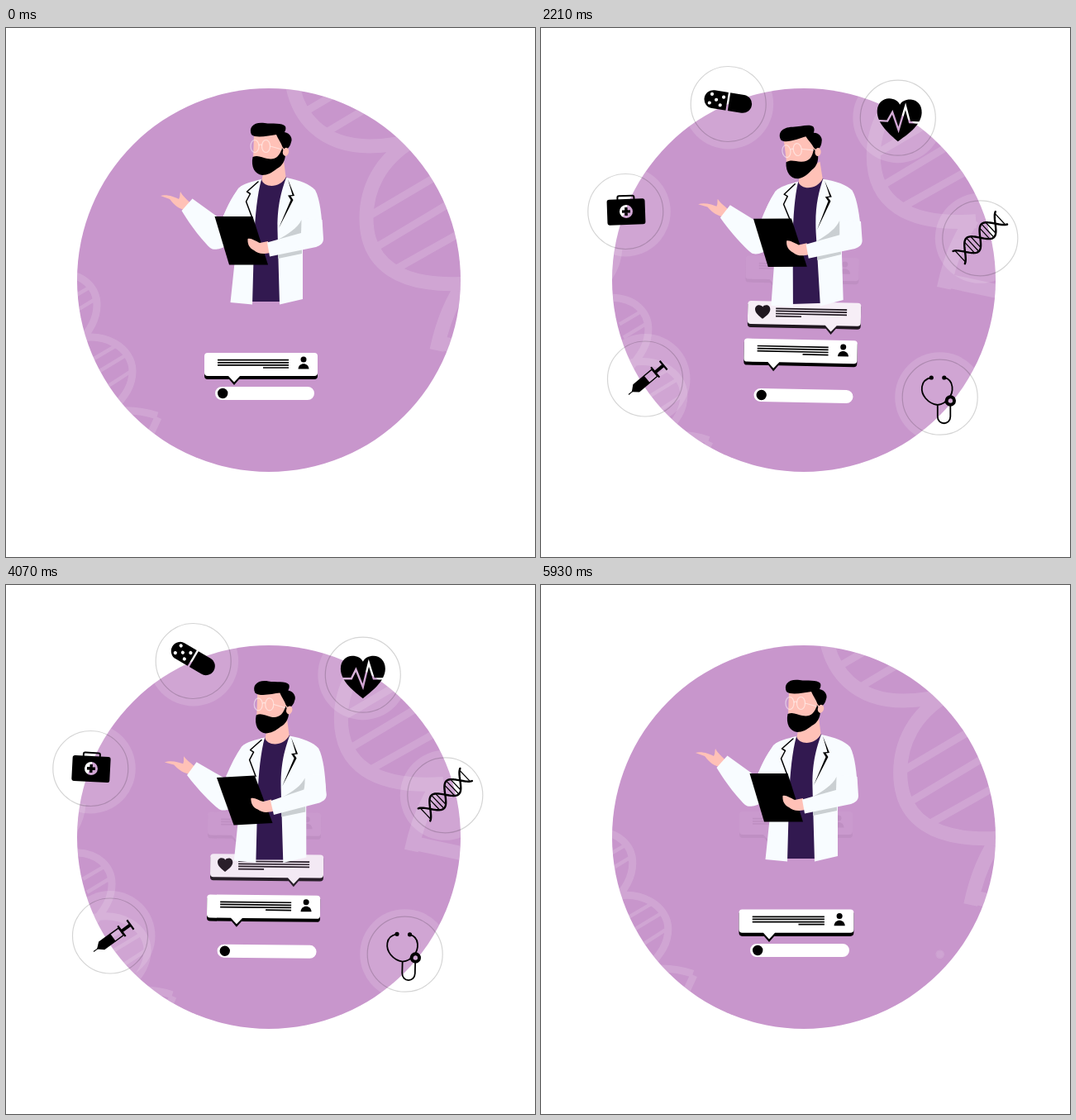
Write an HTML page that moves like this. It is 640 px wide and 640 px high and loops after 6 s.

```html
<!DOCTYPE html>
<html lang="en">
<head>
<meta charset="utf-8">
<title>Online doctor</title>
<style>
  html, body { margin: 0; width: 100%; height: 100%; overflow: hidden; background: #fff; }
  svg { display: block; width: 100vw; height: 100vh; }
  .strand { fill: none; stroke: #fff; opacity: .15; }
  .halo { fill: #fff; opacity: .14; }
  .rim { fill: none; stroke: #000; stroke-opacity: .17; stroke-width: 1.2; }
  .line { fill: none; stroke: #000; stroke-linecap: round; stroke-linejoin: round; }
  .coat { fill: #f8fcff; }
  .skin { fill: #ffc1b7; }
  .shade { fill: #cacfd2; }
</style>
</head>
<body>
<svg viewBox="0 0 640 640">
  <defs>
    <clipPath id="disc"><circle cx="318" cy="305" r="232"/></clipPath>
    <path id="heart" d="M0 0C-9 -7.500 -27 -20 -27 -36C-27 -46 -20 -51.500 -13 -51.500C-7 -51.500 -2 -49 0 -44.500C2 -49 7 -51.500 13 -51.500C20 -51.500 27 -46 27 -36C27 -20 9 -7.500 0 0Z"/>
    <g id="person">
      <path d="M-36 -35H101V-11Q101 -7 97 -7H6L0 0L-6 -7H-32Q-36 -7 -36 -11Z"/>
      <path fill="#fff" d="M-32 -39H97Q101 -39 101 -35V-15Q101 -11 97 -11H7L0 -3.5L-7 -11H-32Q-36 -11 -36 -15V-35Q-36 -39 -32 -39Z"/>
      <path stroke="#000" stroke-width="1.7" d="M-20 -30.3H66M-20 -27.2H66M-20 -24.1H66M35 -21H66"/>
      <circle cx="84" cy="-31" r="3.5"/>
      <path d="M77.5 -19.5C78 -28 90 -28 90.5 -19.5Z"/>
    </g>
    <g id="love">
      <path d="M-101 -35H36V-11Q36 -7 32 -7H6L0 0L-6 -7H-97Q-101 -7 -101 -11Z"/>
      <path fill="#fff" d="M-97 -39H32Q36 -39 36 -35V-15Q36 -11 32 -11H7L0 -3.5L-7 -11H-97Q-101 -11 -101 -15V-35Q-101 -39 -97 -39Z"/>
      <path stroke="#000" stroke-width="1.7" d="M-67 -30.3H19M-67 -27.2H19M-67 -24.1H19M-67 -21H-36"/>
      <use href="#heart" transform="translate(-83 -17.5) scale(.34 .32)"/>
    </g>
    <mask id="pulse" maskUnits="userSpaceOnUse" x="-40" y="-60" width="80" height="70">
      <rect x="-40" y="-60" width="80" height="70" fill="#fff"/>
      <path fill="none" stroke="#000" stroke-width="2.4" d="M-28 -24H-14L-8.5 -35L0 -14L7 -43L13 -24H28"/>
    </mask>
    <mask id="dots" maskUnits="userSpaceOnUse" x="-40" y="-20" width="80" height="40">
      <rect x="-40" y="-20" width="80" height="40" fill="#fff"/>
      <path stroke="#000" stroke-width="2.4" d="M0 -12V12"/>
      <path stroke="#000" stroke-width="4.2" stroke-linecap="round" d="M-22 5h.01M-20.5 -6h.01M-14.4 0h.01M-6 -4.5h.01M-8.8 5.7h.01"/>
    </mask>
  </defs>

  <circle cx="318" cy="305" r="232" fill="#c896cc"/>
  <g clip-path="url(#disc)">
    <g id="strandR" class="strand" stroke-width="17">
      <path d="M344 40C344 115 390 143 440 143C458 143 475 141 496 134M492 136C452 160 436 195 436 230C436 285 475 315 560 309M556 306C542 325 529 352 521 390M516 379L610 399"/>
      <path stroke-width="9" d="M354 106L400 79M383 129L445 92M442 226L525 177M450 264L545 207M471 292L560 242"/>
    </g>
    <g id="strandL" class="strand" stroke-width="9">
      <path d="M74 238C73 255 66 268 58 278M60 297C95 295 110 316 110 335C110 352 102 366 84 386M80 378C120 365 153 388 153 415C153 432 145 445 128 462M128 464C148 461 165 463 183 469M184 471L173 495L158 486"/>
      <path stroke-width="4.5" d="M75 329L104 312M80 345L108 328M98 405L132 385M110 417L148 394M122 434L153 414"/>
    </g>
  </g>

  <g id="badges"></g>

  <g id="chat">
    <g id="bubbles"></g>
    <rect x="253" y="434" width="120" height="16" rx="8" fill="#fff"/>
    <circle cx="262.2" cy="442" r="6.2"/>
  </g>

  <g id="body">
    <path class="skin" d="M312 172L336 160L339 184C334 193 317 198 309 186Z"/>
    <path fill="#321950" d="M309 183C312 194 332 194 339 180L346 200L336 331H296L299 210Z"/>
    <path class="coat" d="M309 183C297 186 287 188 281 194C274 204 268 216 262 230L278 270L271.500 332L298 334.500L299.500 280C300 240 303 205 309 183Z"/>
    <path class="coat" d="M339 181C355 184 368 189 374 196C380 207 382 228 383 246L359 262V328L331 334.500L328.500 245C328 215 333 198 339 181Z"/>
    <path class="shade" d="M357.500 232C353 242 340 250 329 256V279L358 273V265L345 262L357 250Z"/>
    <g id="arm">
      <path class="skin" d="M187 203C194 201 203 204 209 207C211 204 210 201 211 198C214 204 220 208 223 212L215 220C206 217 202 212 198 207Z"/>
      <path class="coat" d="M285 191C276 199 268 214 261 232L225.500 206.500L212.500 221C222 237 238 258 247 266C252 270 262 267 269 262L297 225Z"/>
    </g>
    <path class="line" stroke-width="1.5" d="M305 186L291.500 198L295.500 200.500L290.500 210L298 230"/>
    <path d="M341 183L349 203L344.500 203.500L347.500 208L330 242L344.500 208L341 202.500L346.500 202Z"/>
    <g id="clip">
      <path d="M252.500 228H298.500L317 286.500H270Z"/>
      <path class="skin" d="M292.500 255C297 254 302 258 307 260L317 258L319 272C310 274 305 273 300 269C294 266 292 261 292.500 255Z"/>
      <path class="coat" d="M316 259.500L357 248L362 230L382.500 232L384 255C384 261 380 263 375 265L319 276.500Z"/>
    </g>
    <g id="head">
      <path class="skin" d="M300 128H334L337 150L333 162L316 168L299 160Z"/>
      <path d="M297 129C293 120 300 113 313 115C322 116.500 334 114 338 119C339 122 338 124 337 126C344 127 347 134 345 138C344 143 341 146 338 148L334.500 144C333 139 329 134 327 129C318 130 303 134 297 129Z"/>
      <path d="M298.500 156C305 153 310 157 316 158C325 160 331 156 334 145L338 152C338 161 334 167 328 170C322 175 316 178 310 178C301 177 296 168 298.500 156Z"/>
      <ellipse class="skin" cx="338.500" cy="149.800" rx="3.600" ry="5" transform="rotate(15 338.5 149.8)"/>
      <g fill="none" stroke="#fff" stroke-opacity=".5" stroke-width="1.200">
        <ellipse cx="301" cy="143" rx="5" ry="7.500"/>
        <ellipse cx="314.500" cy="143" rx="5" ry="7.500"/>
        <path d="M306 142Q308 140 309.500 142M319.500 143L334 147"/>
      </g>
    </g>
  </g>
</svg>

<script>
const LOOP = 6000;
const KEYS = [0, 1290, 2210, 2860, 3570, 4570, 5930];
const $ = id => document.getElementById(id);

// Smooth periodic curve through the values at KEYS.
function track(vals, t) {
  const n = KEYS.length;
  const time = i => KEYS[(i + n) % n] + LOOP * Math.floor(i / n);
  const val = i => vals[(i + n) % n];
  const slope = i => (val(i + 1) - val(i - 1)) / (time(i + 1) - time(i - 1));
  let i = n - 1;
  while (KEYS[i] > t) i--;
  const h = time(i + 1) - time(i), u = (t - time(i)) / h, v = 1 - u;
  return v * v * (1 + 2 * u) * val(i) + u * u * (1 + 2 * v) * val(i + 1)
    + h * u * v * (v * slope(i) - u * slope(i + 1));
}

const clamp = x => Math.min(1, Math.max(0, x));
const smooth = x => (x = clamp(x), x * x * (3 - 2 * x));
const backIn = (x, c) => (x = clamp(x), (c + 1) * x ** 3 - c * x * x);
const backOut = (x, c) => 1 - backIn(1 - clamp(x), c);
const place = (el, value) => el.setAttribute('transform', value);

// Joints: pivot, then angle and optional shift at KEYS.
const joints = [
  { id: 'chat', at: [313, 442], turn: [0, 1.8, 1.2, -.8, -.4, 1.3, 0],
    x: [0, 7, 4.5, -3, -2, 6, 0], y: [0, 4, 3, -1, -1, 3, 0] },
  { id: 'body', at: [315, 330], turn: [0, 0, -1.8, -1.3, -1.2, .8, 0],
    x: [0, 11, 6.8, -3.5, -2, 9, 0], y: [0, 4.5, 2.4, -1, -.5, 3, 0] },
  { id: 'head', at: [323, 185], turn: [0, -8, -7.2, -5.5, 1, -1, 0] },
  { id: 'arm', at: [288, 200], turn: [0, -6, -2.2, -.5, -2.8, -7, 0] },
  { id: 'clip', at: [318, 262], turn: [0, 0, 1.5, -3.2, -5, -.8, 0] }
];

function helix() {
  const y = x => 11 * Math.sin(Math.PI * x / 25);
  let a = '', b = '', rungs = '';
  for (let x = -35; x <= 35; x++) {
    a += `${a ? 'L' : 'M'}${x} ${y(x).toFixed(2)}`;
    b += `${b ? 'L' : 'M'}${x} ${-y(x).toFixed(2)}`;
  }
  for (const x of [-33, -17.5, -12.5, -7.5, 7.5, 12.5, 17.5, 33])
    rungs += `M${x} ${y(x)}V${-y(x)}`;
  return `<path class="line" stroke-width="2.4" d="${a}${b}"/>
    <path class="line" stroke-width="1.3" d="${rungs}"/>`;
}

// Round badges: centre, icon pivot, entry and exit time, icon angle at KEYS.
const badges = [
  { c: [126, 424.5], p: [106, 443.5], start: 70, end: 4290, turn: [-44, -45, -40, -33.5, -33.5, -39, -44],
    art: `<path stroke="#000" d="M0 0H8"/><path d="M5 0L12 -6H29V6H12Z"/>
      <path class="line" stroke-width="1.4" d="M29 -5.3H41V5.3H29"/>
      <path stroke="#000" stroke-width="2.2" d="M42 -8V8M55 -7V7"/>
      <path stroke="#000" stroke-width="4" d="M42 0H55"/>` },
  { c: [102.3, 222], p: [103, 222], start: 320, end: 4545, turn: [-2, -2, -2, 1.5, 4.5, 1, -1],
    art: `<path fill-rule="evenodd" d="M-20 -15H20Q23 -15 23 -12V13Q23 16 20 16H-20Q-23 16 -23 13V-12Q-23 -15 -20 -15ZM-8 0A8 8 0 0 0 8 0A8 8 0 0 0 -8 0Z"/>
      <path class="line" stroke-width="2" d="M-10 -15V-17Q-10 -19 -8 -19H8Q10 -19 10 -17V-15"/>
      <path stroke="#000" stroke-width="3.4" d="M-5 0H5M0 -5V5"/>` },
  { c: [226.7, 92], p: [226.3, 89], start: 570, end: 4810, turn: [33, 33, 9, 7, 25, 33, 33],
    art: '<rect x="-29" y="-11" width="58" height="22" rx="11" mask="url(#dots)"/>' },
  { c: [431.8, 108.7], p: [431.8, 137.3], start: 830, end: 5010, turn: [0, 0, 3, 6, 2, -1, 0],
    art: '<use href="#heart" mask="url(#pulse)"/>' },
  { c: [531.3, 254.3], p: [531.3, 253.7], start: 1080, end: 5230, turn: [-56, -52, -43, -35, -31, -56, -56],
    art: helix() },
  { c: [482.7, 446.7], p: [495.3, 451], start: 1340, end: 5443, turn: [0, -1, 0, 2, 4, -1, 0],
    art: `<path class="line" stroke-width="1.8" d="M-23 -28C-38 -25 -36 -10 -30 -3Q-24 4 -15.500 5Q-7 4 -2 -3C4 -10 5 -25 -7.500 -28M-15.500 5V19C-15.500 30 0 30 0 19V5"/>
      <circle cx="-23" cy="-28" r="2.600"/><circle cx="-7.500" cy="-28" r="2.600"/>
      <circle r="4.700" fill="none" stroke="#000" stroke-width="4"/>` }
];
$('badges').innerHTML = badges.map(b => `<g>
  <g><circle class="halo" r="54.5"/><circle class="rim" r="45.5"/></g><g>${b.art}</g></g>`).join('');
badges.forEach((b, i) => [b.ring, b.icon] = $('badges').children[i].children);

// Bubbles: kind, birth, first rise, second rise, opacity left at the top.
const bubbles = [
  ['person', -420, 150, 990, .04],
  ['love', 400, 945, 2060, 0],
  ['person', 1282, 2000, 3000, 0],
  ['love', 2510, 2960, 3900, 0],
  ['person', 3410, 3860, 4900, 0],
  ['love', 4513, 4860, 5350, 0],
  ['person', 5580, 6150, 6990, 0]
];
$('bubbles').innerHTML = bubbles.map(b => `<use href="#${b[0]}"/>`).join('');

function drift(t) {
  const q = 1 - Math.abs(t / 3000 - 1), p = 1 - (1 - q) ** 1.5;
  place($('strandR'), `translate(${-39 * p} ${-87 * p})`);
  place($('strandL'), `translate(${23 * p} ${34 * p})`);
}

function pose(t) {
  for (const { id, at, turn, x, y } of joints) {
    const shift = x ? `translate(${track(x, t)} ${track(y, t)})` : '';
    place($(id), `${shift} rotate(${track(turn, t)} ${at})`);
  }
}

function pop(b, t) {
  const ring = backOut((t - b.start) / 550, 1.7) - backIn((t - b.end) / 500, 1.1);
  const icon = backOut((t - b.start - 200) / 450, 1.7) - backIn((t - b.end + 60) / 400, 1.1);
  place(b.ring, `translate(${b.c}) scale(${Math.max(0, ring)})`);
  place(b.icon, `translate(${b.p}) rotate(${track(b.turn, t)}) scale(${Math.max(0, icon)})`);
}

function talk([kind, birth, first, second, rest], i, t) {
  const el = $('bubbles').children[i];
  const gone = smooth((t - second) / 500);
  const y = 432 - 49.5 * smooth((t - first) / 500) - 69.5 * gone;
  const size = Math.max(0, backOut((t - birth) / 420, .8));
  place(el, `translate(${kind === 'love' ? 344.5 : 276} ${y}) scale(${size})`);
  el.setAttribute('opacity', 1 - (1 - rest) * gone ** 1.2);
}

const begin = performance.now();
function frame(now) {
  const t = Math.max(0, now - begin) % LOOP;
  drift(t);
  pose(t);
  badges.forEach(b => pop(b, t));
  bubbles.forEach((b, i) => talk(b, i, t));
  requestAnimationFrame(frame);
}
frame(begin);
</script>
</body>
</html>
```
